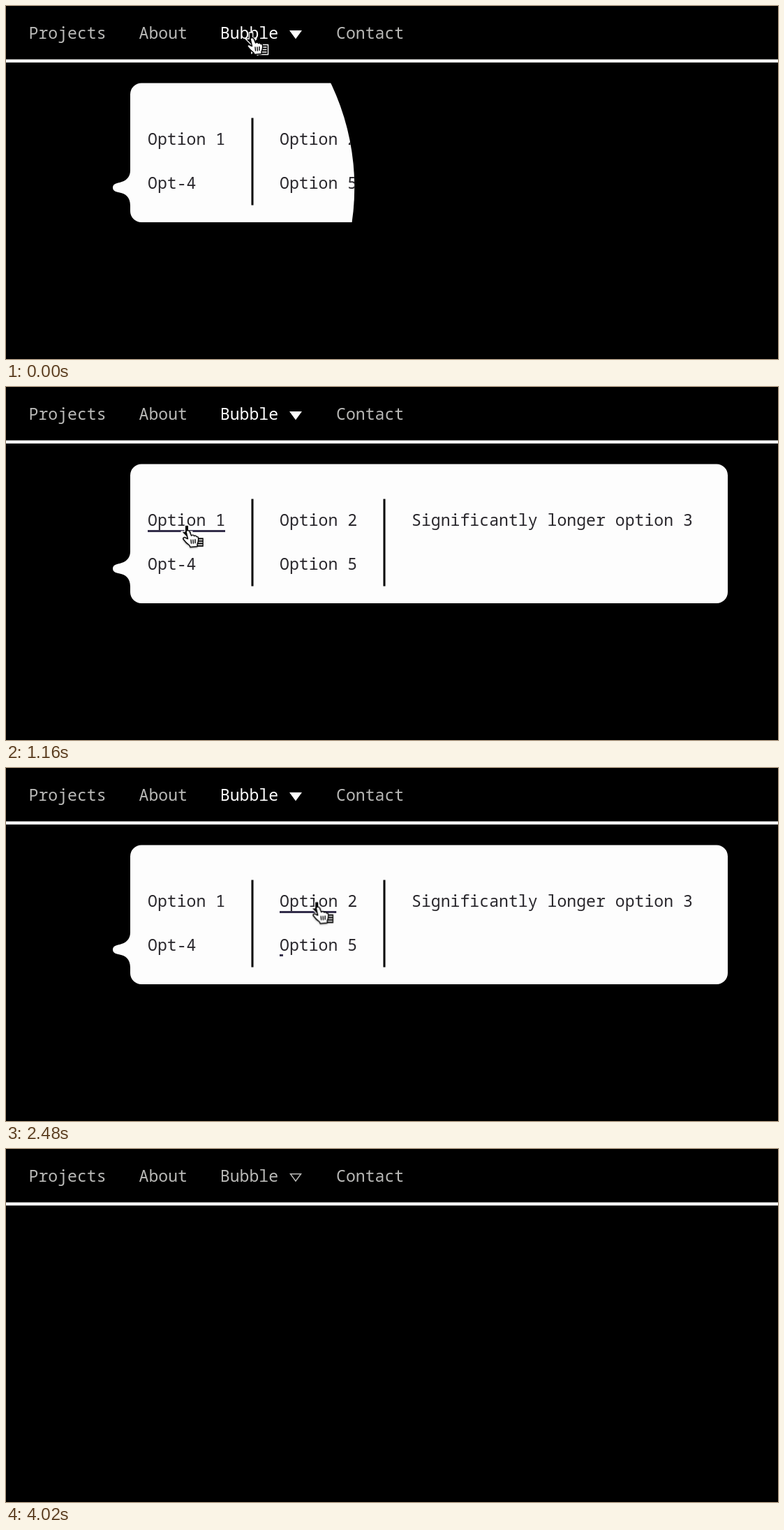
Animation of 1106 by 506 pixels, one loop 4040 ms. Source, as an HTML page:

```html
<!DOCTYPE html>
<html lang="en">
<head>
<meta charset="utf-8">
<title>Bubble menu</title>
<style>
html, body { margin: 0; width: 100%; height: 100%; overflow: hidden; background: #000; }
svg { position: absolute; left: 0; top: 0; width: 1106px; height: 506px; overflow: hidden; }
text { font: 23.16px "Noto Sans Mono", monospace; white-space: pre; }
.nav { fill: #b9b9b7; font-weight: 500; }
.option { fill: #29272c; }
.on, .arrow, .panel, .line, .cursor, .cursor g { animation: 4040ms linear infinite; }

.on { animation-name: label; }
@keyframes label {
  0%, 92.574% { fill: #fff; }
  94.307%, 100% { fill: #b9b9b7; }
}
.arrow { animation-name: arrow; stroke-width: 1.5; }
@keyframes arrow {
  0%, 93.564% { fill: #fff; stroke: #fff; }
  98.02%, 100% { fill: #000; stroke: #b9b9b7; }
}

/* The panel opens as a circle from the tip of its tail. */
.panel { animation-name: reveal; }
@keyframes reveal {
  0% { clip-path: circle(339px at 153px 260px); animation-timing-function: cubic-bezier(.2, .55, .4, 1); }
  5.817% { clip-path: circle(958px at 153px 260px); }
  93.317% { clip-path: circle(958px at 153px 260px); animation-timing-function: ease; }
  99.381%, 100% { clip-path: circle(0 at 153px 260px); }
}

.line { fill: #332e4a; transform: scaleX(0); transform-box: fill-box; transform-origin: left; animation-timing-function: ease; }
.u1 { animation-name: u1; }
.u2 { animation-name: u2; }
.u3 { animation-name: u3; }
.u4 { animation-name: u4; }
.u5 { animation-name: u5; }
@keyframes u1 { 0%, 20.792%, 37.871%, 100% { transform: scaleX(0); } 28.218%, 30.446% { transform: none; } }
@keyframes u4 { 0%, 31.436%, 46.856%, 100% { transform: scaleX(0); } 38.861%, 39.431% { transform: none; } }
@keyframes u5 { 0%, 43.812%, 63.366%, 100% { transform: scaleX(0); } 51.238%, 55.941% { transform: none; } }
@keyframes u2 { 0%, 58.168%, 76.163%, 100% { transform: scaleX(0); } 65.594%, 68.738% { transform: none; } }
@keyframes u3 { 0%, 71.634%, 95.792%, 100% { transform: scaleX(0); } 79.059%, 88.366% { transform: none; } }

.cursor { animation-name: move; stroke-linejoin: round; stroke-linecap: round; }
@keyframes move {
  0% { transform: translate(351px, 46px); }
  4.95% { transform: translate(350px, 47px); }
  9.901% { transform: translate(338px, 58px); }
  13.861% { transform: translate(325px, 76px); }
  20.792% { transform: translate(262px, 182px); }
  26.733%, 28.713% { transform: translate(259px, 206px); }
  30.446% { transform: translate(256px, 213px); }
  31.436% { transform: translate(252px, 228px); }
  34.653% { transform: translate(246px, 256px); }
  37.129% { transform: translate(250px, 258px); }
  39.431% { transform: translate(273px, 260px); }
  43.812% { transform: translate(391px, 263px); }
  46.04% { transform: translate(427px, 262px); }
  49.505% { transform: translate(440px, 262px); }
  51.485% { transform: translate(440px, 258px); }
  53.96% { transform: translate(440px, 245px); }
  55.941% { transform: translate(440px, 236px); }
  58.168% { transform: translate(441px, 212px); }
  60.644% { transform: translate(444px, 200px); }
  65.594% { transform: translate(452px, 197px); }
  68.738% { transform: translate(503px, 196px); }
  71.634% { transform: translate(581px, 194px); }
  74.752% { transform: translate(631px, 192px); }
  81.683% { transform: translate(645px, 196px); }
  85.396% { transform: translate(760px, 203px); }
  88.366% { transform: translate(880px, 215px); }
  91.584% { transform: translate(1010px, 238px); }
  92.822% { transform: translate(1060px, 246px); }
  93.441%, 100% { transform: translate(1115px, 250px); }
}
.cursor g { animation-timing-function: step-end; }
.down { animation-name: down; }
.menu { animation-name: menu; }
.hand { animation-name: hand; filter: drop-shadow(0 1px 1px #0005); }
@keyframes down { 0% { opacity: 1; } 11.634%, 100% { opacity: 0; } }
@keyframes menu {
  0%, 20.792%, 31.436%, 43.812%, 58.168%, 71.634%, 93.441%, 100% { opacity: 0; }
  11.634%, 30.446%, 39.431%, 55.941%, 68.738%, 88.366% { opacity: 1; }
}
@keyframes hand {
  0%, 30.446%, 39.431%, 55.941%, 68.738%, 88.366%, 100% { opacity: 0; }
  20.792%, 31.436%, 43.812%, 58.168%, 71.634% { opacity: 1; }
}
</style>
</head>
<body>
<svg viewBox="0 0 1106 506">
  <rect y="76.5" width="1106" height="4.5" fill="#fdfdfb"/>
  <g class="nav">
    <text x="32.5" y="47">Projects</text>
    <text x="190.5" y="47">About</text>
    <text class="on" x="306.8" y="47">Bubble</text>
    <text x="473" y="47">Contact</text>
  </g>
  <path class="arrow" d="M407.5 35.7H422.5L415 46Z"/>
</svg>

<svg class="panel" viewBox="0 0 1106 506">
  <path fill="#fdfdfd" d="M194 110.5H1018A16 16 0 0 1 1034 126.500V294A16 16 0 0 1 1018 310H194A16 16 0 0 1 178 294V286C178 274 171 269 163 267.500C157 266.500 153 265 153 260C153 256 157 254 163 253C171 251 178 246 178 236V126.500A16 16 0 0 1 194 110.500Z"/>
  <path d="M353 160.500V285.500M542 160.500V285.500" stroke="#000" stroke-width="3"/>
  <g class="option">
    <text x="203" y="199">Option 1</text>
    <text x="392" y="199">Option 2</text>
    <text x="581" y="199">Significantly longer option 3</text>
    <text x="203" y="262">Opt-4</text>
    <text x="392" y="262">Option 5</text>
  </g>
  <rect class="line u1" x="203" y="205" width="111" height="3"/>
  <rect class="line u2" x="392" y="205" width="111" height="3"/>
  <rect class="line u3" x="581" y="205" width="403" height="3"/>
  <rect class="line u4" x="203" y="267" width="69.5" height="3"/>
  <rect class="line u5" x="392" y="267" width="111" height="3"/>
</svg>

<svg viewBox="0 0 1106 506">
  <g class="cursor">
    <g class="down" stroke="#fff" stroke-width="1.3">
      <path d="M-2.700-8H2.700V1H8L0 9L-8 1H-2.700Z"/>
    </g>
    <g class="menu" stroke="#fff" stroke-width="1.4">
      <path d="M.7 1.500V22L5.500 17.500L9 24.500L12 23L9 16.500H15Z"/>
      <path d="M12.500 9.500H24.500V23.500H12.500Z"/>
      <path d="M15 13H22M15 16.500H22M15 20H22"/>
    </g>
    <g class="hand" fill="#fff" stroke="#000" stroke-width="1.4">
      <path d="M-1 1C0-1 3-1 4 1L6.500 7C8 5.500 10 6 10.500 7.500C12 6.500 13.500 7 14 8.500C15.500 8 16.500 9 16.500 11C17 15 16 17 15 19V22.500L5 23.500L4 21C1 19-3 15-5 12C-6 10-3 8.500-1 10.500L1.500 11.500Z"/>
      <path d="M6 13L6.500 18M9 13L9.300 18M12 12.500V17.500" fill="none"/>
    </g>
  </g>
</svg>
</body>
</html>
```
